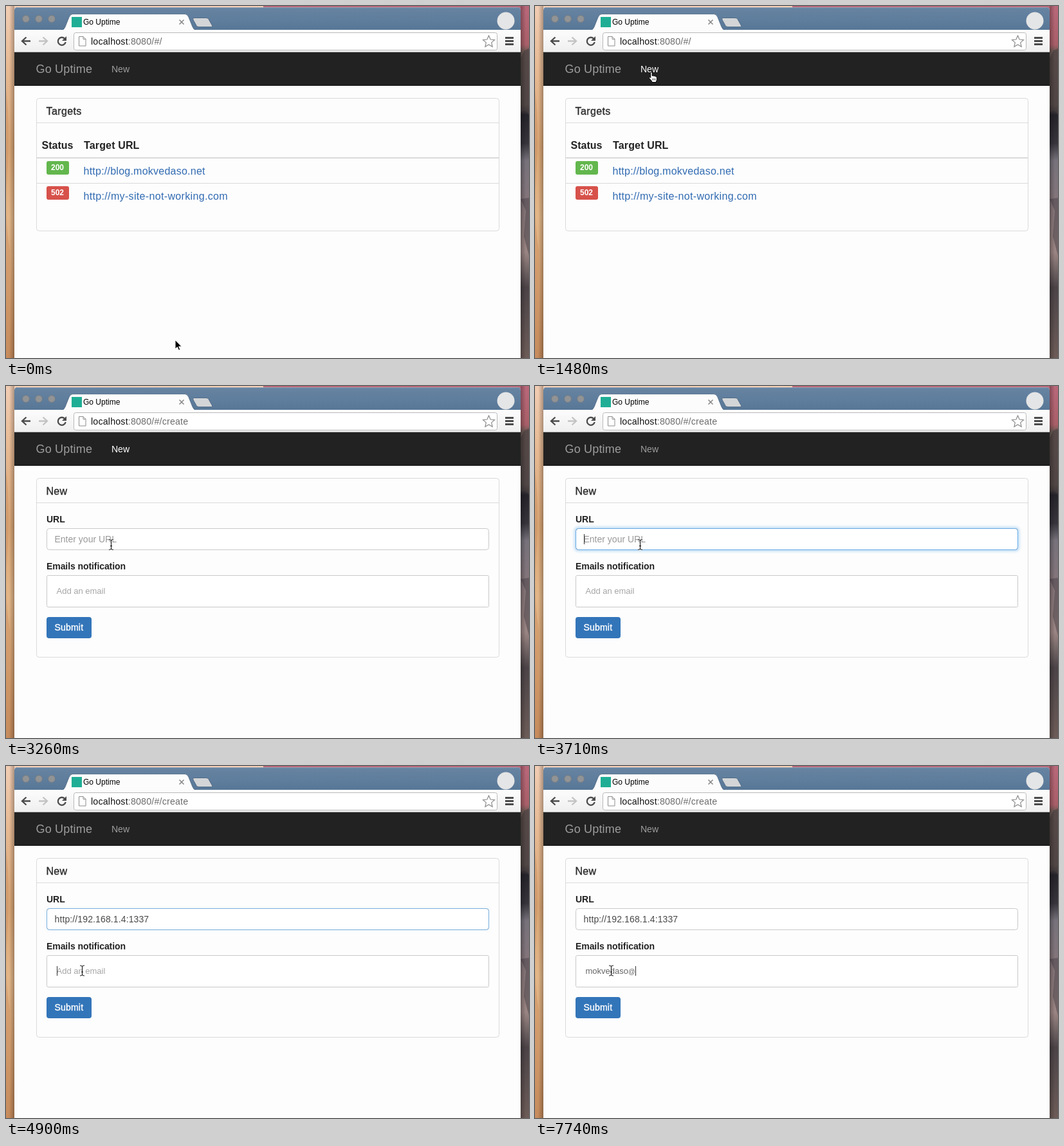
An HTML page for the animation above (8 s loop, 813x547 px).

```html
<!DOCTYPE html>
<html lang="en">
<head>
<meta charset="utf-8">
<title>Go Uptime</title>
<style>
html, body { margin: 0; width: 100%; height: 100%; overflow: hidden; background: #fdfdfd; }
svg { display: block; font: 14px "Liberation Sans", Arial, sans-serif; }
text { white-space: pre; }
.b { font-weight: bold; }
.med { stroke: currentColor; stroke-width: .35; fill: currentColor; }
.h16 { font-size: 16px; color: #2a2a2a; }
.dark { fill: #222; }
.link { font-size: 16px; fill: #316bb2; }
.line { fill: none; stroke: #dadada; }
.field { fill: #fff; stroke: #c9c9c9; }
.tag { font-size: 12px; fill: #fff; font-weight: bold; }
.caret { fill: #333; }
</style>
</head>
<body>
<svg width="813" height="547" viewBox="0 0 813 547">
<defs>
  <linearGradient id="sand" x2="0" y2="1">
    <stop offset="0" stop-color="#f1cdb4"/><stop offset=".15" stop-color="#e9bd98"/>
    <stop offset=".4" stop-color="#d9a574"/><stop offset=".6" stop-color="#e3b688"/>
    <stop offset=".8" stop-color="#d6a06f"/><stop offset="1" stop-color="#c4895a"/>
  </linearGradient>
  <linearGradient id="rock" x2="0" y2="1">
    <stop offset="0" stop-color="#b9687a"/><stop offset=".11" stop-color="#a95f68"/>
    <stop offset=".13" stop-color="#6b5a55"/><stop offset=".28" stop-color="#5d5250"/>
    <stop offset=".31" stop-color="#25232a"/><stop offset=".39" stop-color="#37343c"/>
    <stop offset=".44" stop-color="#77727b"/><stop offset=".56" stop-color="#85757a"/>
    <stop offset=".7" stop-color="#9a8583"/><stop offset=".8" stop-color="#4b4347"/>
    <stop offset="1" stop-color="#6d5c58"/>
  </linearGradient>
  <linearGradient id="bar" x2="0" y2="1">
    <stop offset="0" stop-color="#6784a2"/><stop offset="1" stop-color="#587797"/>
  </linearGradient>
  <linearGradient id="tools" x2="0" y2="1">
    <stop offset="0" stop-color="#fcfcfc"/><stop offset="1" stop-color="#efefef"/>
  </linearGradient>
  <linearGradient id="shade">
    <stop offset="0" stop-opacity="0"/><stop offset="1" stop-opacity=".28"/>
  </linearGradient>
  <filter id="blur" x="-5%" y="-50%" width="110%" height="200%"><feGaussianBlur stdDeviation="2"/></filter>
</defs>

<!-- desktop -->
<rect width="400" height="547" fill="url(#sand)"/>
<rect x="400" width="413" height="547" fill="url(#rock)"/>
<path d="M0 130q7 60 2 130t4 120l-2 167h-4z" fill="#c98f61" opacity=".45"/>
<path d="M813 66l-7 3-6 12v84l7-3 6 7z" fill="#493f3e" opacity=".6"/>
<path d="M800 300l8 18-3 40 8 30v-90z" fill="#4a4248" opacity=".5"/>
<rect x="5" width="8" height="547" fill="url(#shade)"/>
<rect x="-808" width="8" height="547" fill="url(#shade)" transform="scale(-1 1)"/>

<!-- browser window -->
<path d="M13 547V7q0-5 5-5h777q5 0 5 5v540z" fill="#fdfdfd"/>
<path d="M13 37V7q0-5 5-5h777q5 0 5 5v30z" fill="url(#bar)"/>
<path d="M17 2.5h779" stroke="#8da4bb"/>
<g fill="#919395" stroke="#747c85">
  <circle cx="31" cy="20" r="5.5"/><circle cx="51" cy="20" r="5.5"/><circle cx="71" cy="20" r="5.5"/>
</g>
<path d="M292 18.500h19q3 0 4 2l5 9q2 3-2 3h-18q-3 0-4-2l-5-9q-1-3 1-3z" fill="#d3d5d7" stroke="#4f6a87"/>
<path d="M86 37.500q4 0 6-5l6-15q2-5 6-5h174q4 0 6 5l6 15q2 5 6 5z" fill="#fcfcfc" stroke="#4b6682" stroke-width=".8"/>
<rect x="102" y="17" width="16" height="16" fill="#1fae95"/>
<text x="120" y="29" font-size="12">Go Uptime</text>
<path d="M269.500 21.500l7 7m0-7l-7 7" stroke="#858585" stroke-width="1.500"/>
<circle cx="777" cy="23" r="13.500" fill="#e4e5e6"/>

<rect x="13" y="37" width="787" height="35" fill="url(#tools)"/>
<rect x="13" y="71" width="787" height="1" fill="#b5b5b5"/>
<g fill="none" stroke="#4b4b4b" stroke-width="2.300">
  <path d="M38 54.500H25m6.500-6l-6.500 6 6.500 6"/>
  <path d="M51 54.500h13m-6.500-6l6.500 6-6.500 6" stroke="#c3c3c3"/>
  <path d="M91.500 51a6 6 0 1 0 1.200 5"/>
  <path d="M776 49.500h13m-13 5h13m-13 5h13" stroke-width="3"/>
</g>
<path d="M94 47v7h-7z" fill="#4b4b4b"/>
<rect x="105.500" y="41.500" width="658" height="27" rx="3" fill="#fff" stroke="#b9b9b9"/>
<path d="M113.500 47.500h6.500l4 4v10.500h-10.500zM120 47.500v4h4" fill="#fff" stroke="#8d8d8d"/>
<text x="132" y="60" letter-spacing=".2" font-size="14.200" fill="#111">localhost<tspan id="path" fill="#6c6c6c">:8080/#/</tspan></text>
<path d="M750.500 46l2.600 6 6.400.600-4.800 4.300 1.400 6.300-5.600-3.300-5.600 3.300 1.400-6.300-4.800-4.300 6.400-.600z" fill="#fff" stroke="#8a8a8a" stroke-width="1.200"/>

<!-- page -->
<rect x="13" y="72" width="787" height="52" fill="#222"/>
<rect x="13" y="123" width="787" height="1" fill="#0a0a0a"/>
<text x="46.500" y="104" font-size="18" letter-spacing=".18" fill="#9d9d9d">Go Uptime</text>
<text id="nav" x="164" y="103" fill="#9d9d9d">New</text>

<g id="list">
  <rect class="line" x="47.500" y="143.500" width="719" height="206" rx="4"/>
  <path class="line" d="M48 181.500h718M48 275.500h718"/>
  <path class="line" d="M48 236h718" stroke-width="2"/>
  <text class="med h16" x="62.500" y="169" letter-spacing=".4">Targets</text>
  <text class="b dark" x="55.500" y="222" font-size="16">Status</text>
  <text class="b dark" x="121" y="222" font-size="16" letter-spacing=".15">Target URL</text>
  <rect x="63" y="241" width="35" height="21" rx="3" fill="#63b74d"/>
  <text class="tag" x="70" y="255">200</text>
  <rect x="63" y="280" width="35" height="21" rx="3" fill="#d7524b"/>
  <text class="tag" x="70" y="294">502</text>
  <text class="link" x="120.500" y="262" letter-spacing=".24">http://blog.mokvedaso.net</text>
  <text class="link" x="120.500" y="301" letter-spacing=".34">http://my-site-not-working.com</text>
</g>

<g id="form">
  <rect class="line" x="47.500" y="143.500" width="719" height="278" rx="4"/>
  <path class="line" d="M48 181.500h718"/>
  <text class="med h16" x="62.500" y="169" letter-spacing=".3">New</text>
  <text class="b dark" x="63" y="212">URL</text>
  <rect id="glow" x="63" y="221" width="688" height="34" rx="4" fill="none" stroke="#66afe9" stroke-width="3" filter="url(#blur)"/>
  <rect class="field" x="63.500" y="221.500" width="687" height="33" rx="4"/>
  <rect id="ring" x="63.500" y="221.500" width="687" height="33" rx="4" fill="none" stroke="#66a9e4"/>
  <text id="url" x="75.500" y="243"></text>
  <rect id="urlCaret" class="caret" y="230" width="1" height="16"/>
  <text class="b dark" x="63" y="285" letter-spacing="-.08">Emails notification</text>
  <rect class="field" x="63.500" y="294.500" width="687" height="49" rx="2"/>
  <text id="mail" x="78.500" y="323" font-size="13"><tspan id="user"></tspan><tspan id="at" font-size="10.500"></tspan></text>
  <rect id="mailCaret" class="caret" y="311" width="1" height="15"/>
  <rect x="63" y="359" width="70" height="33" rx="4" fill="#3375b9"/>
  <text class="med" x="75.500" y="380" letter-spacing=".2" color="#fff">Submit</text>
</g>

<!-- pointers, each with its hot spot at 0,0 -->
<path id="arrow" d="M0 0v14l3.300-3 2.200 5 2.300-1-2.200-4.800h4.400z" stroke="#fff"/>
<g id="hand" stroke="#000" stroke-linejoin="round">
  <path d="M-2 1q0-1.500 1.300-1.500T.6 1v4.500q2-.9 2.600.4 2-.7 2.500.6 2.200-.3 2.200 1.700v3q0 1.500-1 2.700v1.600h-6.700v-1.400l-3.900-4.600q-.8-1.600.7-1.900 .8 0 1.300.9z" fill="#fff"/>
  <path d="M1.300 9.500v3m2-3v3m2-3v3" stroke-width=".7"/>
</g>
<g id="beam" fill="none">
  <path d="M-3.500-8q2.500 0 3.500 1.500Q1-8 3.500-8M0-6.500v13M-3.500 8Q-1 8 0 6.500 1 8 3.500 8M-1.500 2h3" stroke="#fff" stroke-width="2.500" opacity=".7"/>
  <path d="M-3.500-8q2.500 0 3.500 1.500Q1-8 3.500-8M0-6.500v13M-3.500 8Q-1 8 0 6.500 1 8 3.500 8M-1.500 2h3" stroke="#111" stroke-width="1.100"/>
</g>
</svg>

<script>
const LOOP = 8000;
const $ = id => document.getElementById(id);
const USER = "mokvedaso@";
const ADDRESS = "http://192.168.1.4:1337";

// [start ms, value]: each value holds until the next start
const pointer = [
  [0, ["arrow", 263, 519]], [150, ["arrow", 258, 494]], [300, ["arrow", 241, 400]],
  [440, ["arrow", 220, 275]], [590, ["arrow", 205, 172]], [730, ["arrow", 182, 134]],
  [880, ["hand", 175, 103]], [1480, ["hand", 181.5, 103]],
  [2970, ["arrow", 179, 132]], [3120, ["arrow", 168, 200]], [3260, ["beam", 163.5, 246.5]],
  [4160, ["none", 0, 0]], [4310, ["beam", 150, 264]], [4450, ["beam", 124, 304]],
  [4600, ["beam", 118.5, 318]]
];
const hover = [[0, false], [880, true], [3560, false]];
const focus = [[0, [0, 0]], [3560, [.5, .3]], [3710, [1, .6]], [4900, [.8, .08]], [5050, [0, 0]]];
const urlCaret = [[0, false], [3710, true], [4900, false]];
const mailCaret = [[0, false], [4900, true], [5350, false], [5800, true]];
const typed = [
  [0, 0], [5800, 1], [5950, 2], [6250, 4], [6540, 5],
  [6840, 6], [6990, 7], [7140, 8], [7290, 9], [7740, 10]
];

const at = (steps, t) => steps.filter(s => s[0] <= t).pop()[1];
const show = (id, on) => { $(id).style.display = on ? "" : "none"; };
const put = (id, s) => { if ($(id).textContent !== s) $(id).textContent = s; };

function placeCaret(id, textId, left, empty, on) {
  show(id, on);
  const width = empty ? 0 : $(textId).getComputedTextLength();
  $(id).setAttribute("x", Math.round(left + width));
}

function draw(t) {
  const form = t >= 2520;
  show("list", !form);
  show("form", form);
  put("path", ":8080/#/" + (form ? "create" : ""));
  $("nav").style.fill = at(hover, t) ? "#fff" : "#9d9d9d";

  const [ring, glow] = at(focus, t);
  $("ring").style.opacity = ring;
  $("glow").style.opacity = glow;

  const filled = t >= 4160;
  put("url", filled ? ADDRESS : "Enter your URL");
  $("url").style.fill = filled ? "#484848" : "#999";
  $("url").style.letterSpacing = filled ? ".12px" : "0";
  placeCaret("urlCaret", "url", 75.5, !filled, at(urlCaret, t));

  const n = at(typed, t);
  put("user", n ? USER.slice(0, Math.min(n, 9)) : "Add an email");
  put("at", USER.slice(9, n));
  $("mail").style.fill = n ? "#666" : "#a5a5a5";
  placeCaret("mailCaret", "mail", 78.5, !n, at(mailCaret, t));

  const [kind, x, y] = at(pointer, t);
  for (const id of ["arrow", "hand", "beam"]) show(id, id === kind);
  if (kind !== "none") $(kind).setAttribute("transform", `translate(${x} ${y})`);
}

const start = performance.now();
function tick() {
  draw((performance.now() - start) % LOOP);
  requestAnimationFrame(tick);
}
tick();
</script>
</body>
</html>
```
